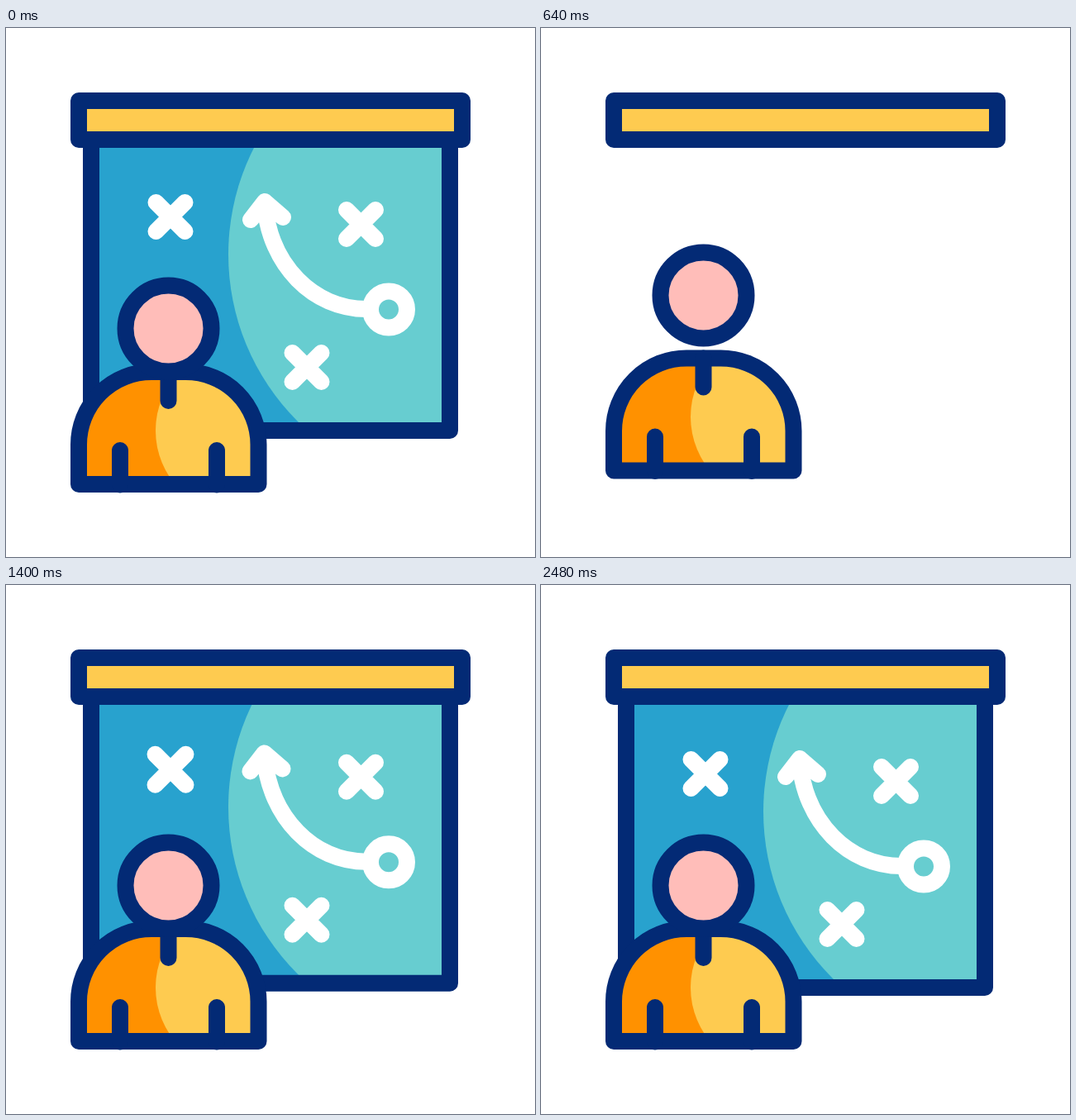
Write an HTML page that moves like this. It is 640 by 640 pixels and loops after 2600 ms.

```html
<!DOCTYPE html>
<html lang="en">
<head>
<meta charset="utf-8">
<title>Tactics board</title>
<style>
  html, body { margin: 0; width: 100%; height: 100%; overflow: hidden; background: #fff; }
  svg { display: block; width: 100%; height: 100%; }
  .line { fill: none; stroke: #032a75; stroke-width: 20; stroke-linecap: round; stroke-linejoin: round; }
  .chalk { fill: none; stroke: #fff; stroke-width: 20; stroke-linecap: round; stroke-linejoin: round; }
</style>
</head>
<body>
<svg viewBox="0 0 640 640">
  <defs>
    <clipPath id="below"><rect y="130" width="640" height="510"/></clipPath>
    <clipPath id="sheet"><rect x="103" y="60" width="434" height="427"/></clipPath>
    <path id="torso" d="M88 552V504a88 88 0 0 1 88-88h41.5a88 88 0 0 1 88 88v48z"/>
    <clipPath id="coat"><use href="#torso"/></clipPath>
  </defs>
  <g clip-path="url(#below)">
    <g id="board">
      <g clip-path="url(#sheet)">
        <rect x="103" y="60" width="434" height="427" fill="#28a2ce"/>
        <circle cx="554" cy="274" r="285" fill="#67cdd0"/>
      </g>
      <path class="line" d="M103 60V487H537V60"/>
      <path class="chalk" id="crossA"/>
      <path class="chalk" id="crossB"/>
      <path class="chalk" id="crossC"/>
      <path class="chalk" id="arrow"/>
      <circle class="chalk" id="ring" cy="340.5"/>
    </g>
  </g>
  <rect class="line" x="88" y="88" width="464" height="47" style="fill:#fecb50"/>
  <g id="body">
    <g clip-path="url(#coat)">
      <rect x="78" y="406" width="238" height="156" fill="#ff9100"/>
      <circle cx="283" cy="487" r="102" fill="#fecb50"/>
    </g>
    <use href="#torso" class="line"/>
    <path class="line" d="M196.5 416v35M138 511v41.5M255 511v41.5"/>
  </g>
  <circle class="line" id="head" cx="196.5" cy="363.5" r="52" style="fill:#ffbdb9"/>
</svg>
<script>
const LOOP = 2600;
const $ = id => document.getElementById(id);

// Each track is a list of [time, value] keys, eased between neighbours.
const pulse = (start, peak, end, size) => [[start, 0], [peak, size], [end, 0]];
const tracks = {
  board: [[40, 0], [620, -352], [880, -352], [1490, 16], [1920, 0]],
  body: pulse(40, 480, 960, -22.4),
  head: pulse(40, 520, 1040, -46.5),
  crossA: pulse(1320, 1680, 2040, 7.5),
  crossB: pulse(1460, 1830, 2200, 7.2),
  crossC: pulse(1720, 2080, 2440, 6.8),
  ring: pulse(1440, 1800, 2160, 6.7),
  arrow: pulse(1280, 2000, 2420, 19.2)
};
const crosses = { crossA: [199, 228.5], crossB: [429.5, 237.5], crossC: [364, 410.5] };

function valueAt(keys, t) {
  if (t <= keys[0][0]) return keys[0][1];
  for (let i = 1; i < keys.length; i++) {
    const [t0, a] = keys[i - 1], [t1, b] = keys[i];
    if (t < t1) {
      const p = (t - t0) / (t1 - t0);
      return a + (b - a) * p * p * (3 - 2 * p);
    }
  }
  return keys[keys.length - 1][1];
}

function arrowPath(k) {
  const dx = -0.35 * k, dy = -0.95 * k;
  const x = 313 + dx, y = 210 + dy;
  return `M${x - 17} ${y + 22}L${x} ${y}L${x + 22} ${y + 19}` +
    `M${x} ${y + 3}C${319 + dx / 2} ${287 + dy / 4} 372 340 436 340`;
}

function draw(t) {
  const at = name => valueAt(tracks[name], t);
  for (const name of ["board", "body", "head"])
    $(name).setAttribute("transform", `translate(0 ${at(name)})`);
  for (const name in crosses) {
    const [x, y] = crosses[name], r = 17.5 + at(name);
    $(name).setAttribute("d",
      `M${x - r} ${y - r}L${x + r} ${y + r}M${x + r} ${y - r}L${x - r} ${y + r}`);
  }
  const grow = at("ring");
  $("ring").setAttribute("cx", 463 + grow);
  $("ring").setAttribute("r", 22 + grow);
  $("arrow").setAttribute("d", arrowPath(at("arrow")));
}

const begin = performance.now();
function tick() {
  draw((performance.now() - begin) % LOOP);
  requestAnimationFrame(tick);
}
tick();
</script>
</body>
</html>
```
